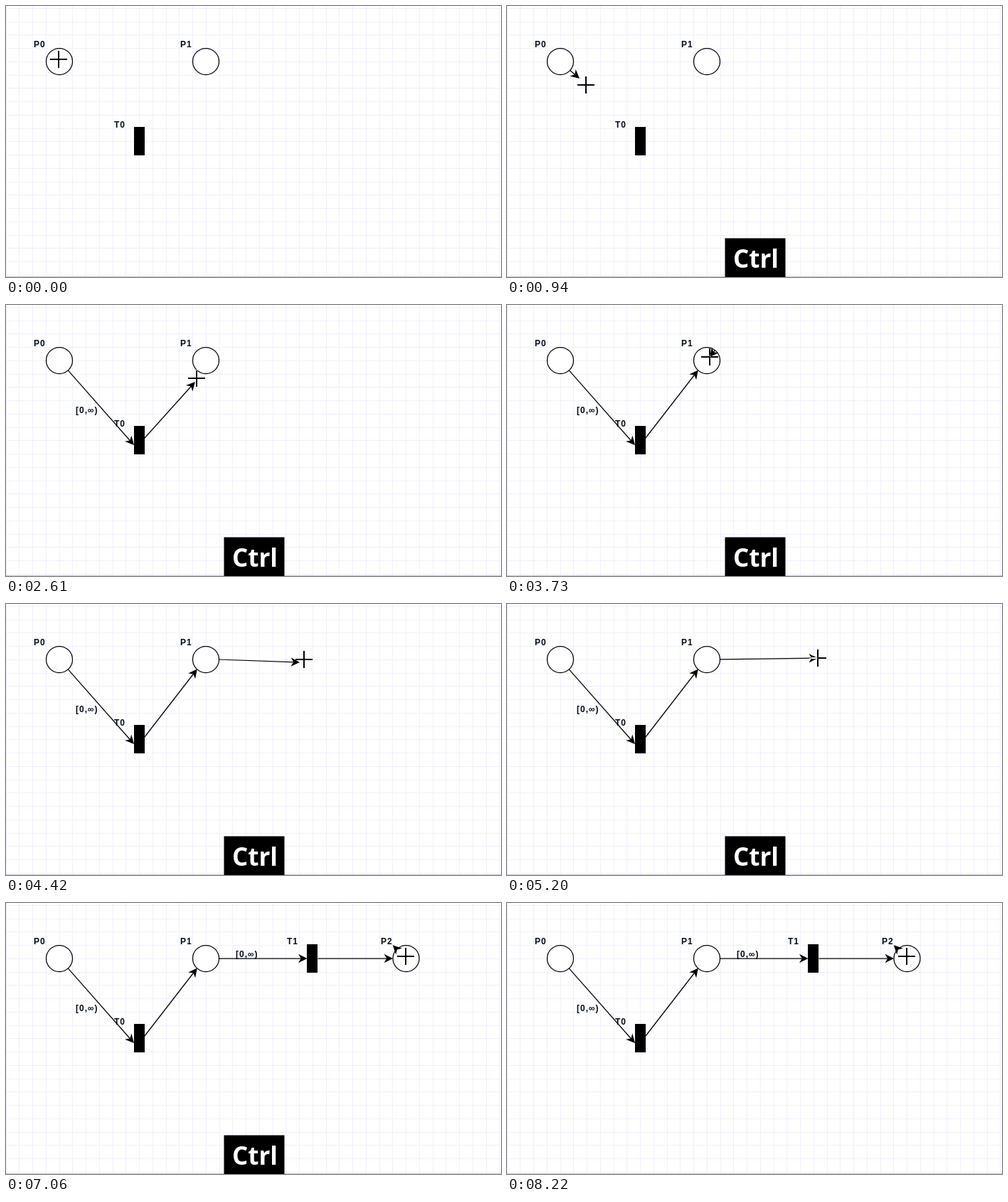
Animation, 696 px wide and 381 px high, one loop 8.94 s. Source, as an HTML page with a canvas:

```html
<!DOCTYPE html>
<html lang="en">
<head>
<meta charset="utf-8">
<title>Drawing a Petri net</title>
<style>
  html, body { margin: 0; width: 100%; height: 100%; overflow: hidden; background: #fff; }
  canvas { display: block; }
</style>
</head>
<body>
<canvas id="stage" width="696" height="381"></canvas>
<script>
const ctx = document.getElementById('stage').getContext('2d');
const LOOP = 8940, STEP = 60, GRID = 18.75, R = 18.5;
const pt = (x, y) => ({ x, y });

const P0 = { name: 'P0', x: 75, y: 78, since: 0 };
const P1 = { name: 'P1', x: 281, y: 78, since: 0 };
const P2 = { name: 'P2', x: 562.5, y: 78, since: 7000 };
const T0 = { name: 'T0', x: 187.5, y: 190.5, since: 0, out: pt(194.5, 187.5) };
const T1 = { name: 'T1', x: 431, y: 78, since: 5560, out: pt(438.5, 78) };

// Each arc follows the pointer from start, snaps to its goal, then is done
const ARCS = [
  { from: P0, start: 670, snap: 1330, done: 2010, hover: pt(180.5, 190.5), end: pt(180, 197), label: pt(98, 152) },
  { from: T0, start: 2070, snap: 2730, done: 2850, end: pt(268.8, 91.5) },
  { from: P1, start: 3670, snap: 5560, done: 5560, end: pt(423.5, 78), label: pt(323, 76) },
  { from: T1, start: 5610, snap: 7000, done: 7000, end: pt(544, 78) },
  { from: P2, start: 7060 }
];

// Pointer moves along quadratic curves; without a bend they are straight
const START = pt(74, 75);
const GLIDES = [
  { start: 690, end: 1470, to: pt(194, 191) },
  { start: 2070, end: 2610, to: pt(268, 103), bend: pt(263, 125) },
  { start: 2610, end: 2850, to: pt(285, 73) },
  { start: 3700, end: 4540, to: pt(428, 68), bend: pt(402, 108) },
  { start: 4630, end: 4810, to: pt(437, 76) },
  { start: 5610, end: 6150, to: pt(497, 72), bend: pt(483, 63) },
  { start: 6150, end: 6450, to: pt(549, 76) },
  { start: 6540, end: 6780, to: pt(562, 75) }
];

function glide(a, b, bend, u) {
  const mix = k => {
    const c = bend ? bend[k] : (a[k] + b[k]) / 2;
    return Math.round((1 - u) ** 2 * a[k] + 2 * u * (1 - u) * c + u * u * b[k]);
  };
  return pt(mix('x'), mix('y'));
}

function pointerAt(t) {
  let at = START;
  for (const { start, end, to, bend } of GLIDES) {
    if (t < start) break;
    const elapsed = Math.floor((t - start) / STEP) * STEP;
    at = glide(at, to, bend, Math.min(1, elapsed / (end - start)));
  }
  return at;
}

const angleOf = (a, b) => Math.atan2(b.y - a.y, b.x - a.x);
const along = (p, angle, d) => pt(p.x + d * Math.cos(angle), p.y + d * Math.sin(angle));

function head(tip, angle) {
  ctx.save();
  ctx.translate(tip.x, tip.y);
  ctx.rotate(angle);
  ctx.beginPath();
  ctx.moveTo(0, 0);
  ctx.lineTo(-12.5, -6.25);
  ctx.lineTo(-8.75, 0);
  ctx.lineTo(-12.5, 6.25);
  ctx.fill();
  ctx.restore();
}

function arrow(from, to) {
  const angle = angleOf(from, to), neck = along(to, angle, -6);
  ctx.beginPath();
  ctx.moveTo(from.x, from.y);
  ctx.lineTo(neck.x, neck.y);
  ctx.stroke();
  head(to, angle);
}

function arc(t, { from, start, snap, done, end, hover = end, label }) {
  if (t < start) return;
  if (t < start + STEP || !end) {
    // No length yet: only the head shows, at the node's corner
    head(pt(from.x - GRID, from.y - GRID), -Math.PI * 3 / 4);
    return;
  }
  const tip = t >= done ? end : t >= snap ? hover : pointerAt(t - STEP);
  const aim = t >= done ? end : pointerAt(t);
  arrow(from.out || along(from, angleOf(from, aim), R), tip);
  if (label && t >= done) text('[0,∞)', label.x, label.y);
}

function text(string, x, y) {
  ctx.font = 'bold 12px "Liberation Sans", Arial, sans-serif';
  ctx.letterSpacing = '1px';
  ctx.fillStyle = '#000a18';
  ctx.fillText(string, x, y);
  ctx.fillStyle = '#000';
}

function node({ name, x, y, out }) {
  if (out) {
    ctx.fillStyle = '#000';
    ctx.fillRect(Math.floor(x - 7.5), Math.round(y - 20.25), 15, 40);
  } else {
    ctx.beginPath();
    ctx.arc(x, y, R, 0, 2 * Math.PI);
    ctx.fillStyle = '#fff';
    ctx.fill();
    ctx.stroke();
  }
  text(name, Math.round(x - 36), Math.round(y - 20));
}

function grid() {
  ctx.fillStyle = '#fff';
  ctx.fillRect(0, 0, 696, 381);
  ctx.fillStyle = '#f0f0ff';
  for (let k = 0; k < 38; k++) {
    ctx.fillRect(Math.floor(k * GRID), 0, 1, 381);
    ctx.fillRect(0, Math.round(2.9 + k * GRID), 696, 1);
  }
  ctx.fillStyle = '#c8c4d4';
  ctx.fillRect(0, 380, 696, 1);
}

function keyBadge() {
  ctx.fillStyle = '#000';
  ctx.fillRect(306.5, 326.5, 85, 55);
  ctx.fillStyle = '#fff';
  ctx.font = 'bold 35px "Open Sans", "Noto Sans", sans-serif';
  ctx.letterSpacing = '0px';
  ctx.textAlign = 'center';
  ctx.fillText('Ctrl', 350, 367.5);
  ctx.textAlign = 'left';
}

function crosshair({ x, y }) {
  ctx.globalCompositeOperation = 'difference';
  ctx.fillStyle = '#fff';
  ctx.beginPath();
  ctx.rect(x - 1, y - 12, 2, 24);
  ctx.rect(x - 12, y - 1, 24, 2);
  ctx.fill();
  ctx.globalCompositeOperation = 'source-over';
}

function draw() {
  const t = performance.now() % LOOP;
  ctx.strokeStyle = '#000';
  ctx.lineWidth = 1.25;
  grid();
  for (const n of [P0, P1, P2, T0, T1]) {
    if (t >= n.since) node(n);
  }
  for (const a of ARCS) arc(t, a);
  if (t >= 600 && t < 8220) keyBadge();
  crosshair(pointerAt(t));
  requestAnimationFrame(draw);
}
requestAnimationFrame(draw);
</script>
</body>
</html>
```
